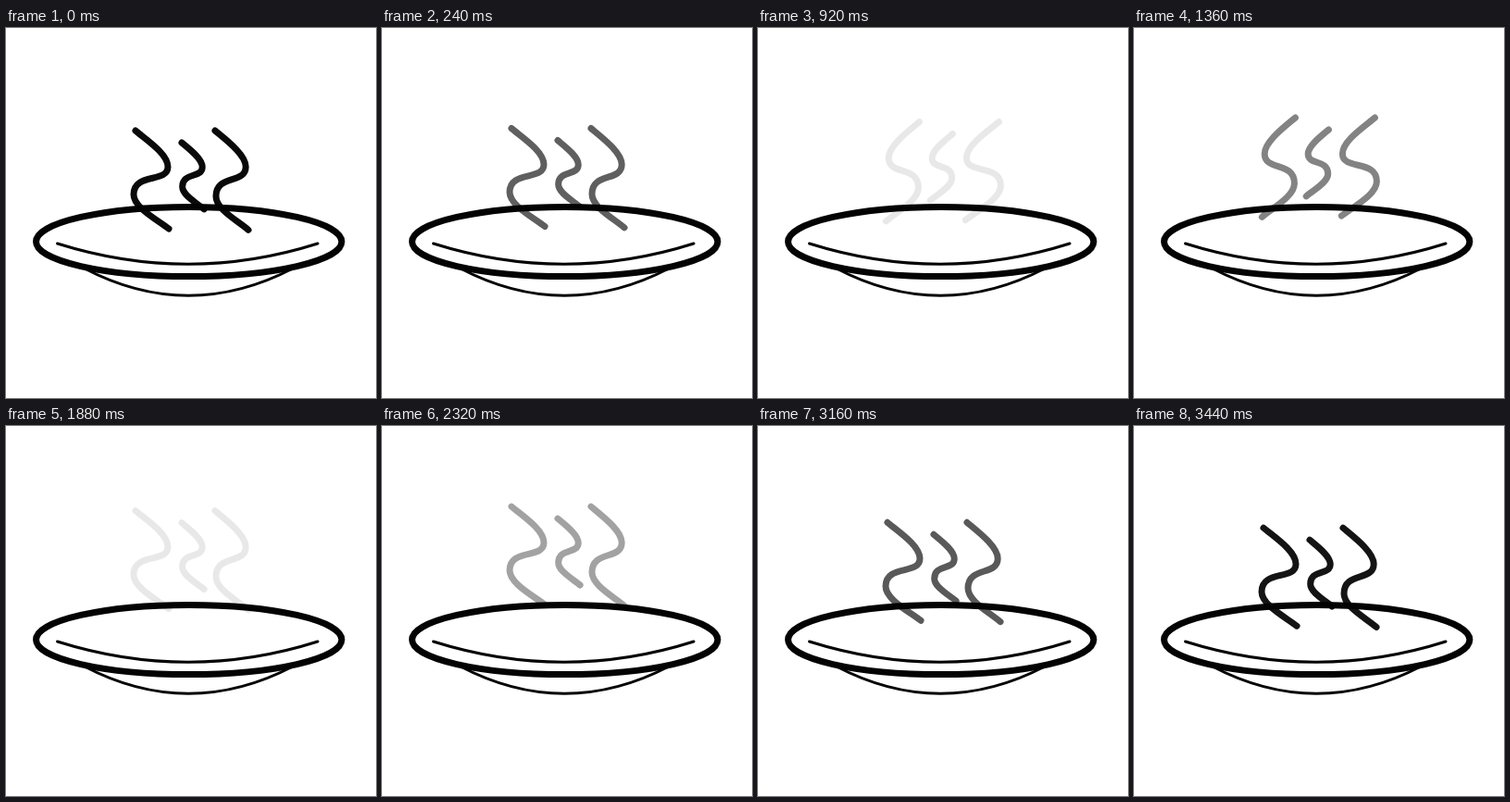
An HTML page with a canvas that plays this animation: 400 by 400 pixels, repeating every 3480 ms.

```html
<!DOCTYPE html>
<html lang="en">
<head>
<meta charset="utf-8">
<title>Steaming plate</title>
<style>
  html, body { margin: 0; width: 100%; height: 100%; overflow: hidden; background: #fff; }
  canvas { display: block; width: 100vw; height: 100vh; }
</style>
</head>
<body>
<canvas id="stage" width="400" height="400"></canvas>
<script>
const ctx = document.getElementById('stage').getContext('2d');
const LOOP = 3480;
const STEP = 40;
const INK = '#040304';

// Steam keys: [time, value]
const LIFT = [[0, 0], [2330, -24], [LOOP, 0]];
const OPACITY = [[0, 0.97], [240, 0.63], [580, 0.32], [870, 0.04], [920, 0.09],
  [1320, 0.54], [1740, 0], [2320, 0.37], [2880, 0.38], [LOOP, 0.97]];
const FLIP_START = 870, FLIP_END = 1740;

// Wisps relative to their upper ends
const wide = new Path2D('M0 0 C12 10 35 25 35 39 C35 57 -2 45 -2 69 C-2 83 23 96 36 106');
const narrow = new Path2D('M0 0 C12 10 33.2 26 33.2 39 C33.2 58 1 47 1 71 C1 85 24 97 36 107.3');

function placed(path, x, y, size) {
  const shape = new Path2D();
  shape.addPath(path, new DOMMatrix([size, 0, 0, size, x, y]));
  return shape;
}

const steam = new Path2D();
steam.addPath(placed(wide, 140, 111, 1));
steam.addPath(placed(narrow, 190, 124, 0.67));
steam.addPath(placed(narrow, 226, 111, 1));

const rim = new Path2D();
rim.ellipse(197.7, 231, 165.2, 37.6, 0, 0, Math.PI * 2);
const innerLine = new Path2D('M55.5 233 Q197 277.5 337 233');
const base = new Path2D('M84 259.5 Q197 319 311 259.5');

function valueAt(keys, t) {
  const i = Math.max(1, keys.findIndex(key => key[0] >= t));
  const [t0, v0] = keys[i - 1];
  const [t1, v1] = keys[i];
  return v0 + (v1 - v0) * (t - t0) / (t1 - t0);
}

function strokePath(path, width) {
  ctx.lineWidth = width;
  ctx.stroke(path);
}

function drawPlate() {
  strokePath(rim, 7);
  strokePath(innerLine, 3);
  strokePath(base, 3);
}

function drawSteam(t) {
  ctx.save();
  ctx.translate(200.2, valueAt(LIFT, t));
  if (t >= FLIP_START && t < FLIP_END) ctx.scale(-1, 1);
  ctx.translate(-200.2, 0);
  ctx.globalAlpha = valueAt(OPACITY, t);
  strokePath(steam, 7);
  ctx.restore();
}

function draw(now) {
  const t = Math.floor(now % LOOP / STEP) * STEP;
  ctx.fillStyle = '#fff';
  ctx.fillRect(0, 0, 400, 400);
  ctx.strokeStyle = INK;
  ctx.lineCap = ctx.lineJoin = 'round';
  drawPlate();
  drawSteam(t);
}

let start;
function tick(now) {
  start ??= now;
  draw(Math.max(0, now - start));
  requestAnimationFrame(tick);
}
draw(0);
requestAnimationFrame(tick);
</script>
</body>
</html>
```
